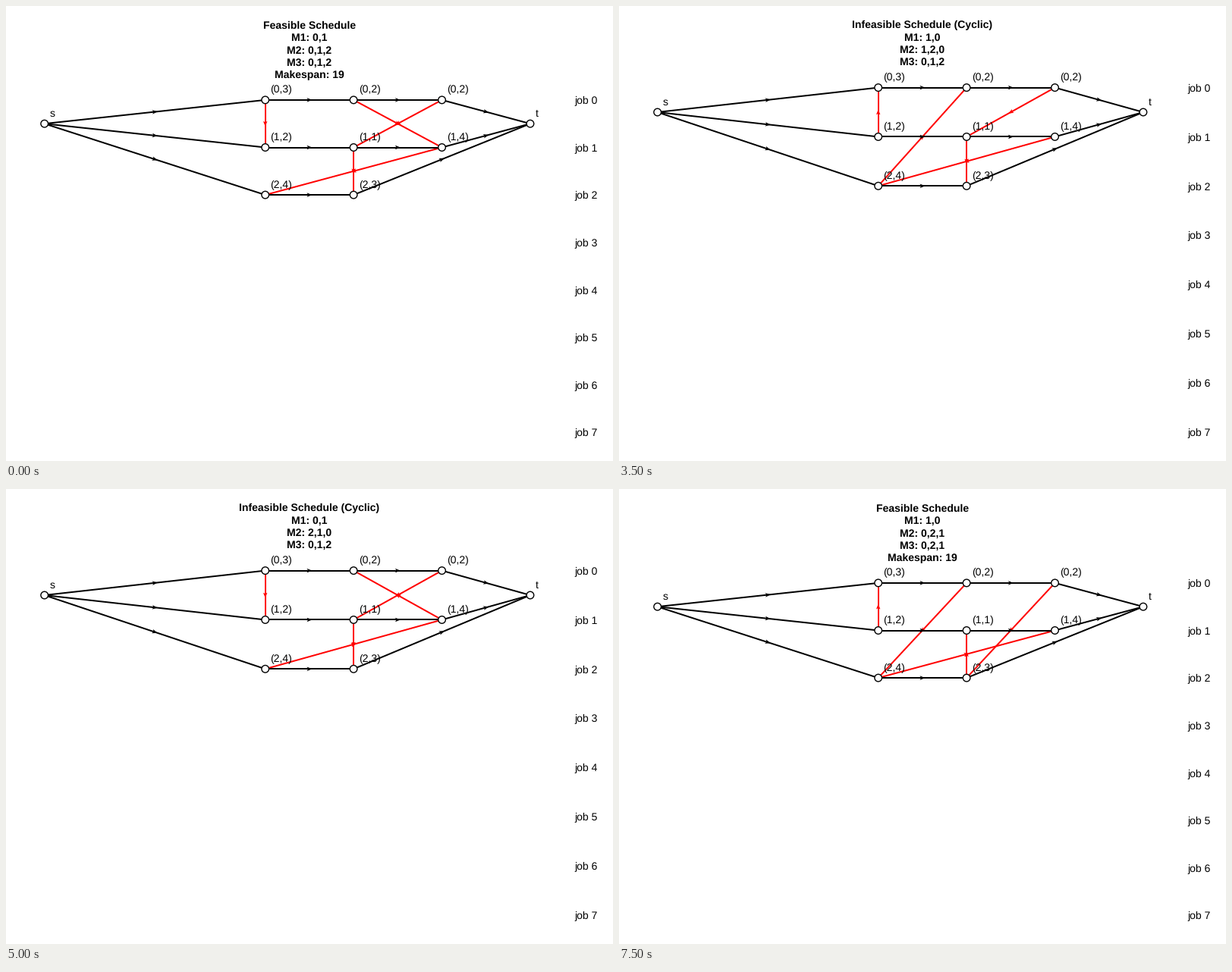
A matplotlib script for the animation above (8000 ms loop, 800 px wide and 600 px high).

```python
from itertools import islice, permutations, product

import matplotlib.pyplot as plt
import numpy as np
from matplotlib.animation import FuncAnimation
from matplotlib.patches import Circle, Polygon

W, H, DPI = 800, 600, 100
PX = 72 / DPI          # points per pixel
COUNT, INTERVAL = 16, 500

plt.rcParams["font.family"] = "Liberation Sans"
plt.rcParams["text.hinting"] = "none"

# Per job: operation durations and the machine each operation runs on
TIMES = [[3, 2, 2], [2, 1, 4], [4, 3]]
ROUTE = [[0, 1, 2], [0, 2, 1], [1, 2]]
OPS = [(j, k) for j, job in enumerate(TIMES) for k in range(len(job))]
JOB_EDGES = [((j, k), (j, k + 1)) for j, k in OPS if k + 1 < len(TIMES[j])]

ORDERS = [
    (m1, m2, m3)
    for m3, m2, m1 in islice(
        product(permutations(range(3)), permutations(range(3)), permutations(range(2))),
        COUNT,
    )
]

fig = plt.figure(figsize=(W / DPI, H / DPI), dpi=DPI, facecolor="white")
ax = fig.add_axes([0, 0, 1, 1])


def machine_edges(orders):
    edges = []
    for m, order in enumerate(orders):
        ops = [(j, ROUTE[j].index(m)) for j in order]
        edges += zip(ops, ops[1:])
    return edges


def makespan(edges):
    """Longest path through the operations, or None if they form a cycle."""
    start = dict.fromkeys(OPS, 0)
    for _ in range(len(OPS) + 1):
        changed = False
        for a, b in edges:
            ready = start[a] + TIMES[a[0]][a[1]]
            if ready > start[b]:
                start[b], changed = ready, True
        if not changed:
            return max(start[j, k] + TIMES[j][k] for j, k in OPS)
    return None


def label(x, y, s, **kw):
    ax.text(x, y, s, fontsize=14 * PX, color="black", va="baseline", zorder=6, **kw)


def arrow(a, b, color, z):
    a, b = np.array(a), np.array(b)
    ax.plot(*zip(a, b), color=color, lw=2 * PX, zorder=z, solid_capstyle="butt")
    d = (b - a) / np.hypot(*(b - a))
    n = np.array([-d[1], d[0]])
    head = [(3.6, 0), (-3.4, 2.8), (-1.7, 0), (-3.4, -2.8)]
    ax.add_patch(Polygon([(a + b) / 2 + u * d + v * n for u, v in head],
                         fc=color, ec="none", zorder=z))


def node(p, text):
    ax.add_patch(Circle(p, 4.8, fc="white", ec="black", lw=1.4 * PX, zorder=5))
    label(p[0] + 6.6, p[1] - 9.5, text)


def draw(i):
    ax.cla()
    ax.set(xlim=(0, W), ylim=(H, 0))
    ax.axis("off")

    orders = ORDERS[i]
    links = machine_edges(orders)
    span = makespan(JOB_EDGES + links)
    feasible = span is not None

    lines = ["Feasible Schedule" if feasible else "Infeasible Schedule (Cyclic)"]
    lines += [f"M{m}: {','.join(map(str, o))}" for m, o in enumerate(orders, 1)]
    if feasible:
        lines.append(f"Makespan: {span}")
    top, row0, step = (29.8, 123.9, 62.6) if feasible else (29.1, 107.6, 64.85)
    for k, s in enumerate(lines):
        label(400, top + 16.3 * k, s, ha="center", weight="bold")

    def at(row, col):
        return 341.7 + 116.4 * col, row0 + step * row

    source, sink = at(0.5, -2.5), at(0.5, 3)
    for a, b in links:
        arrow(at(*a), at(*b), "red", 2)
    for a, b in JOB_EDGES:
        arrow(at(*a), at(*b), "black", 3)
    for j, job in enumerate(TIMES):
        arrow(source, at(j, 0), "black", 3)
        arrow(at(j, len(job) - 1), sink, "black", 3)

    node(source, "s")
    node(sink, "t")
    for j, k in OPS:
        node(at(j, k), f"({j},{TIMES[j][k]})")
    for j in range(8):
        x, y = at(j, 3.5)
        label(x, y + 5.4, f"job {j}")
    return []


anim = FuncAnimation(fig, draw, frames=COUNT, interval=INTERVAL,
                     init_func=lambda: draw(0), repeat=True, repeat_delay=0)
plt.show()
```
